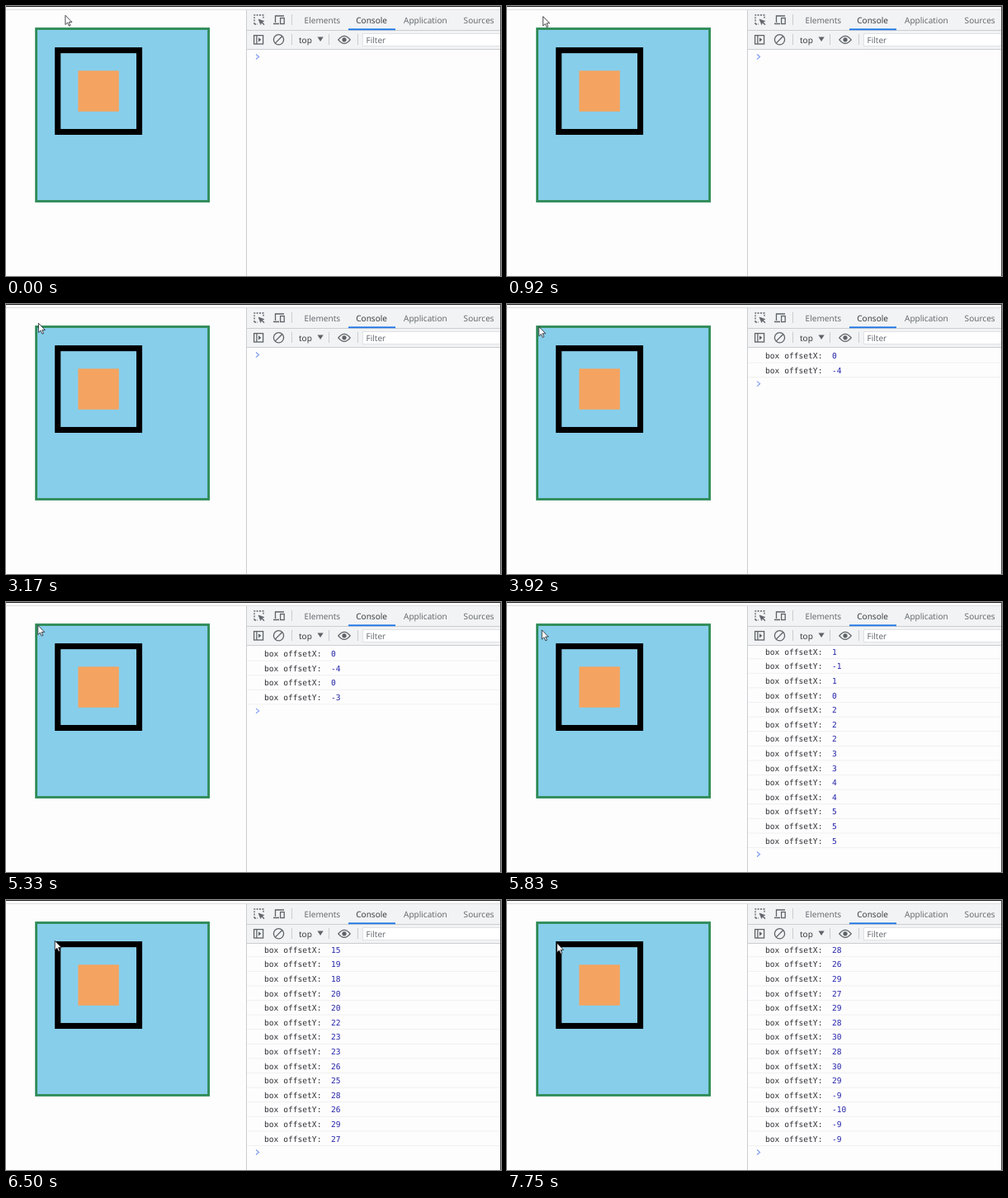
Recreate the animation shown at these times as an HTML page. Size 600x327 px, loop 8000 ms.

```html
<!DOCTYPE html>
<html lang="en">
<head>
<meta charset="utf-8">
<title>Mouse offset log</title>
<style>
  html, body { margin: 0; width: 100%; height: 100%; overflow: hidden; background: #fefdfe; }
  svg { display: block; width: 100vw; height: 100vh; text-rendering: geometricPrecision; }
  .ui { font: 10.1px "Open Sans", "Noto Sans", sans-serif; fill: #5f6368; }
  .ui .dark { fill: #303236; }
  .log { font: 9.62px "DejaVu Sans Mono", "Noto Sans Mono", monospace; fill: #303034; }
  .log .num { fill: #2424a8; }
  .log path { stroke: #f0f0f0; }
  .icon { fill: none; stroke: #5f6368; stroke-width: 1.3; }
  .rule { fill: none; stroke: #cbcdd1; }
</style>
</head>
<body>
<svg viewBox="0 0 600 327">
  <defs>
    <clipPath id="pane"><rect x="292" y="53" width="307" height="274"/></clipPath>
  </defs>

  <!-- page, in CSS pixels of the recorded window -->
  <g transform="translate(35.2 26.1) scale(.706)">
    <rect x="2" y="2" width="296" height="296" fill="#87ceeb" stroke="#2e8b57" stroke-width="4"/>
    <rect x="39" y="39" width="140" height="140" fill="none" stroke="#000" stroke-width="10"/>
    <rect x="74" y="74" width="70" height="70" fill="#f4a460"/>
  </g>

  <!-- console rows -->
  <g clip-path="url(#pane)">
    <g id="log" class="log"></g>
  </g>

  <!-- toolbars -->
  <rect x="292" y="5" width="308" height="47" fill="#f1f3f4"/>
  <path d="M0 4.5H600" stroke="#dedee0"/>
  <path class="rule" d="M291.5 5V327M292 29.5H600M292 52.5H600"/>
  <path class="rule" d="M346.5 10V23M346.5 34V47M391.5 34V47M426.5 34V47"/>
  <rect x="432.5" y="33.5" width="170" height="15" fill="#fff" stroke="#dfe1e5"/>
  <rect x="415" y="27.4" width="57" height="1.8" fill="#1a73e8"/>
  <g class="icon">
    <path d="M301 22V11H312V15M301 22H305" stroke-dasharray="2 1.4"/>
    <path d="M306 16L313 18.5L309.8 19.6L308.6 22.6Z" fill="#5f6368" stroke-width=".6"/>
    <path d="M309.5 19.2L313 22.8"/>
    <path d="M326.5 20V12H337M324 21.5H331"/>
    <rect x="332.6" y="14.6" width="4.6" height="7"/>
    <rect x="300.6" y="35.6" width="11" height="10.4"/>
    <path d="M303.9 36V46"/>
    <path d="M306 38.2L309.4 40.8L306 43.4Z" fill="#5f6368" stroke="none"/>
    <circle cx="330.5" cy="40.8" r="6.1"/>
    <path d="M334.8 36.5L326.2 45.1"/>
    <path d="M402.8 40.8Q410 31.8 417.2 40.8Q410 49.8 402.8 40.8Z"/>
    <circle cx="410" cy="40.8" r="2" fill="#5f6368"/>
  </g>
  <path d="M377.5 37.6H384.7L381.1 43Z" fill="#5f6368"/>
  <g class="ui">
    <text x="361.6" y="20.6">Elements</text>
    <text x="424.2" y="20.6" class="dark">Console</text>
    <text x="482" y="20.6">Application</text>
    <text x="554.6" y="20.6">Sources</text>
    <text x="355" y="44.5" class="dark">top</text>
    <text x="436.5" y="44.8">Filter</text>
  </g>

  <!-- window edges -->
  <rect width="600" height="1" fill="#1c1c1c"/>
  <rect x="599" width="1" height="327" fill="#4a4a4a"/>

  <path id="cursor" d="M.5 .5V16.5L4.2 13L6.8 18.8L9.2 17.8L6.7 12.1H11.8Z"
        fill="#fff" stroke="#16181c" stroke-width="1.1"/>
</svg>

<script>
const LOOP = 8000, FPS = 12, SCALE = 0.706;
const ROW = 17.6, FIRST_ROW = 62.3, LAST_ROW = 288.7;
const ORIGIN = [38.4, 30];        // pointer tip at offset 0, 0
const INNER = 40, BORDER = 10;    // inner box: padding edge and border width

// Key points: tick, then offset x and y on the way to the box
const approach = [
  [2, 46.5, -26.6], [8, 10, -26], [11, 7.4, -25], [18, 7.4, -25],
  [28, 6, -18.4], [30, 6, -18.4], [34, 2, -14.6], [41, 0, -7], [47, 0, -4]
];
// Key points: tick, then index of the newest log entry
const pace = [[47, 0], [64, 1], [70, 9], [78, 24], [82, 28], [93, 29]];
// Key points: entry index, then offset x and y inside the box
const trail = [
  [0, 0, -4], [2, 0.36, -1.76], [8, 3.52, 4.96], [9, 5, 5.4],
  [18, 15.2, 19], [23, 28.2, 26.2], [27, 30.2, 28.8], [29, 31.2, 31.2]
];

const log = document.getElementById("log");
const cursor = document.getElementById("cursor");

// Linear interpolation between key points
function along(keys, at) {
  const next = keys.findIndex(key => key[0] >= at);
  if (next < 0) return keys.at(-1).slice(1);
  if (next === 0) return keys[0].slice(1);
  const [a, b] = [keys[next - 1], keys[next]];
  const p = (at - a[0]) / (b[0] - a[0]);
  return a.slice(1).map((v, i) => v + (b[i + 1] - v) * p);
}

const pixel = (keys, at) => along(keys, at).map(Math.round);

// Over the inner box, offsets count from its own padding edge
function offset(point) {
  const inside = point.every(v => v >= INNER - BORDER);
  return inside ? point.map(v => v - INNER) : point;
}

function add(parent, tag, attrs, text = "") {
  const el = document.createElementNS("http://www.w3.org/2000/svg", tag);
  for (const key in attrs) el.setAttribute(key, attrs[key]);
  el.textContent = text;
  parent.appendChild(el);
  return el;
}

const rows = [];
function addRow(axis, value) {
  const row = add(log, "g", { transform: `translate(0 ${rows.length * ROW})` });
  add(row, "text", { x: 313, y: 3.8 }, `box offset${axis}:`);
  add(row, "text", { x: 394, y: 3.8, class: "num" }, value);
  add(row, "path", { d: "M292 8.8H599" });
  rows.push(row);
}

for (let i = 0; i <= pace.at(-1)[1]; i++) {
  const [x, y] = offset(pixel(trail, i));
  addRow("X", x);
  addRow("Y", y);
}
const prompt = add(log, "path", {
  d: "M303 -3L306.6 0L303 3", fill: "none", style: "stroke:#7a9bee;stroke-width:1.1"
});

let shown = -1;
function draw(tick) {
  if (tick === shown) return;
  shown = tick;
  const newest = tick < pace[0][0] ? -1 : Math.floor(along(pace, tick)[0]);
  const count = 2 * (newest + 1);
  const point = newest < 0 ? pixel(approach, tick) : pixel(trail, newest);
  const [x, y] = point.map((v, i) => ORIGIN[i] + v * SCALE);
  const top = Math.min(FIRST_ROW, LAST_ROW - ROW * (count - 1));
  cursor.setAttribute("transform", `translate(${x} ${y}) scale(${SCALE})`);
  rows.forEach((row, i) => row.setAttribute("display", i < count ? "inline" : "none"));
  prompt.setAttribute("transform", `translate(0 ${count * ROW - 0.8})`);
  log.setAttribute("transform", `translate(0 ${top})`);
}

const begin = performance.now();
function frame() {
  const t = (performance.now() - begin) % LOOP;
  draw(Math.floor((t + 3.4) * FPS / 1000));
  requestAnimationFrame(frame);
}
frame();
</script>
</body>
</html>
```
